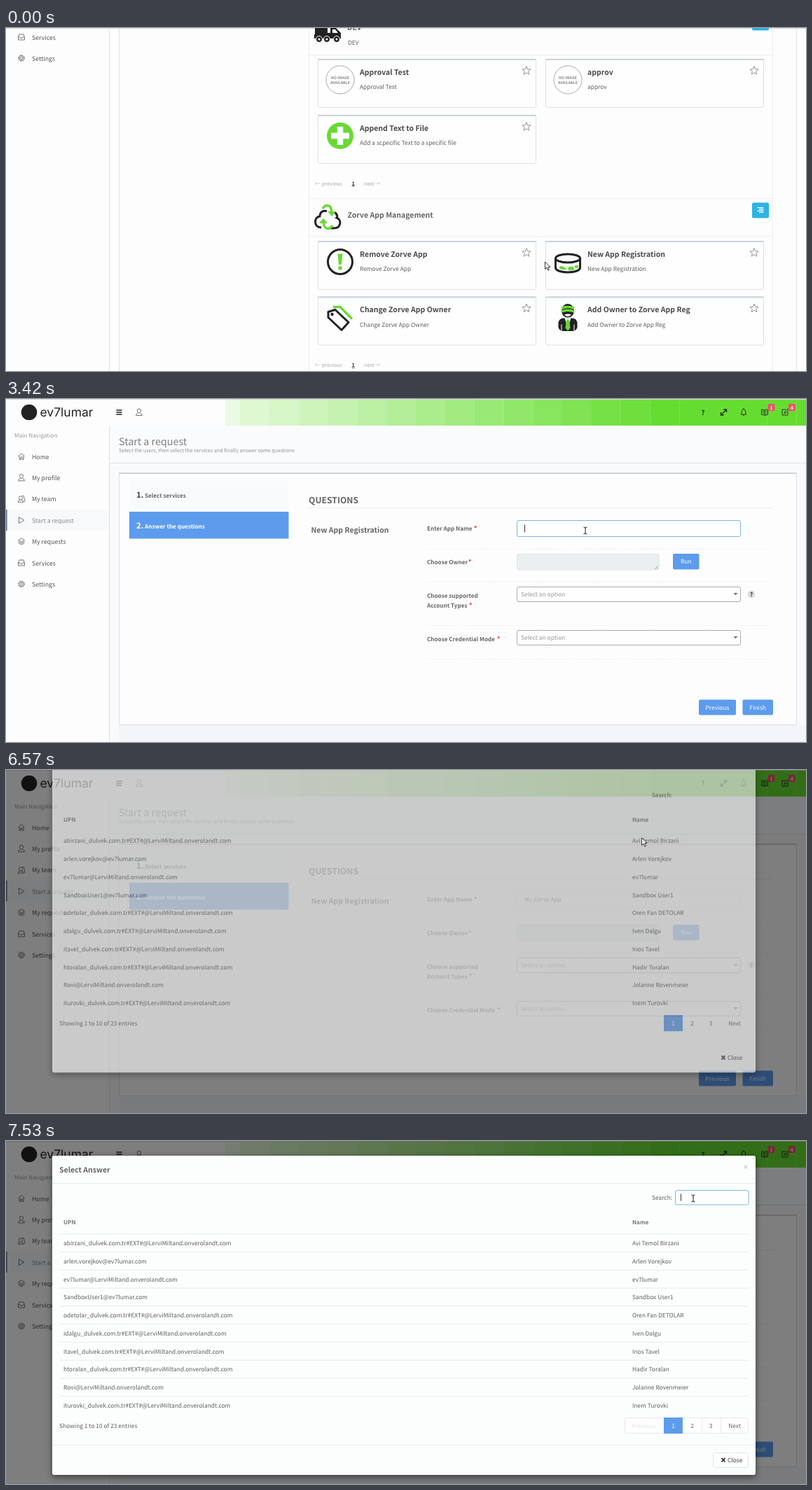
Animation, 1142 px wide and 490 px high, one loop 7.99 s. Source, as an HTML page:

```html
<!DOCTYPE html>
<html lang="en">
<head>
<meta charset="utf-8">
<title>Start a request</title>
<style>
  html, body { margin: 0; width: 100%; height: 100%; overflow: hidden; background: #fdfdfd; }
  svg { display: block; font-family: "Noto Sans CJK JP", "Noto Sans CJK SC", "Noto Sans CJK", "Noto Sans", sans-serif; }
  text { white-space: pre; text-rendering: geometricPrecision; }
  .line { fill: none; stroke: #777; }
  .ink { fill: none; stroke: #222; stroke-width: 3; }
  .lime { fill: none; stroke: #69d836; stroke-width: 3.4; }
  #sheet { filter: drop-shadow(0 3px 5px #0008); }
</style>
</head>
<body>
<svg id="stage" width="1142" height="490" viewBox="0 0 1142 490"></svg>
<script>
const LOOP = 7990, BLUE = '#5d9cec', LIME = '#69d836';
const $ = id => document.getElementById(id);

// Drawing helpers that return SVG markup
const text = (x, y, s, size = 8.4, fill = '#5e5e5e', more = '') =>
  `<text x="${x}" y="${y}" font-size="${size}" fill="${fill}" ${more}>${s}</text>`;
const bold = (x, y, s, size = 8.15, fill = '#666', more = '') =>
  text(x, y, s, size, fill, 'font-weight="700" ' + more);
const rect = (x, y, w, h, fill, more = '') =>
  `<rect x="${x}" y="${y}" width="${w}" height="${h}" fill="${fill}" ${more}/>`;
const box = (x, y, w, h, stroke, fill = '#fefefe', more = '') =>
  rect(x + .5, y + .5, w - 1, h - 1, fill, `rx="2.5" stroke="${stroke}" ${more}`);
const path = (d, more = 'class="line"') => `<path d="${d}" ${more}/>`;
const disc = (x, y, r, more) => `<circle cx="${x}" cy="${y}" r="${r}" ${more}/>`;
const at = (x, y, s) => `<g transform="translate(${x} ${y})">${s}</g>`;
const mid = 'text-anchor="middle"';
const button = (x, y, w, h, label, id = '') =>
  rect(x, y, w, h, BLUE, `rx="2" id="${id}"`) + text(x + w / 2, y + h / 2 + 3.2, label, 8.4, '#fff', mid);

const icons = {
  Home: path('M-4.5 0L0-4.5 4.5 0M-3-1V4.5H-1V1H1V4.5H3V-1'),
  'My profile': path('M0-5Q3-5 2.6-2 2 1 0 1-2 1-2.6-2-3-5 0-5M-1.5 1Q-4.5 2-4.5 4.5H4.5Q4.5 2 1.5 1'),
  'My team': path('M-1-4Q2-4 1.5-1 1 1.5-1 1.5-3 1.5-3.5-1-4-4-1-4M-2 1.5Q-5 2-5 4.5H3Q3 2 0 1.5M1-5Q4.5-5 4 -1 5 2 5 4.5'),
  'Start a request': path('M-3.5-4.5L4 0-3.5 4.5Z'),
  'My requests': path('M0-4.5L4.5-2 0 .5-4.5-2ZM-4.5 0L0 2.5 4.5 0M-4.5 2L0 4.5 4.5 2'),
  Services: path('M-4.5 0L-3-4H3L4.5 0V4H-4.5ZM-4.5 0H-2L-1 1.5H1L2 0H4.5'),
  Settings: disc(0, 0, 1.7, 'class="line"') + disc(0, 0, 3.6, 'class="line"') +
    disc(0, 0, 4.5, 'class="line" stroke-dasharray="1.6 1.93"')
};
const navItem = (name, y) =>
  at(22, y, icons[name]) + text(37, y + 3.6, name, 8.75, name == 'Start a request' ? '#888' : '#555');

const star = (x, y) => {
  let d = '';
  for (let i = 0; i < 10; i++) {
    const a = (i / 5 - .5) * Math.PI, r = i % 2 ? 2.8 : 6.4;
    d += `${i ? 'L' : 'M'}${x + r * Math.cos(a)} ${y + r * Math.sin(a)}`;
  }
  return path(d + 'Z', 'fill="none" stroke="#888" stroke-width=".9"');
};

// Service icons, centred on 0,0
const noImage = disc(0, 0, 20, 'fill="#fff" stroke="#aaa"') +
  bold(0, -1, 'NO IMAGE', 5.3, '#888', mid) + bold(0, 5.5, 'AVAILABLE', 5.3, '#888', mid);
const plus = disc(0, 0, 19, `fill="${LIME}"`) + path('M0-13V13M-13 0H13', 'stroke="#fff" stroke-width="8.5"');
const alertIcon = disc(0, 0, 17.5, 'class="ink"') +
  path('M-3.5-11.5H3.5L2 4H-2Z', `fill="${LIME}"`) + disc(0, 9, 2.8, `fill="${LIME}"`);
const disk = `<ellipse cy="-5" rx="17.5" ry="6" class="ink"/>` +
  path('M-17.5-5V9C-15 17 15 17 17.5 9V-5', 'class="ink"') +
  path('M-12 7Q-7 5-3 9T-12 10ZM0 8Q8 5 9 9T1 12ZM9 6Q15 3 15 7T10 8Z', `fill="${LIME}"`);
const tag = path('M-10-15H0L17 2', 'class="lime"') +
  path('M-17-8L-7-11 12 7 2 18-17 0Z', 'class="ink" stroke-linejoin="round"') + disc(-11.5, -4.5, 2.2, 'fill="#222"');
const person = path('M-9-9Q-8-19.5 0-19.5T9-9Q8 0 0 0T-9-9', 'fill="#222"') +
  path('M-9-13Q0-17 9-13M-9-8.5Q0-12 9-8.5', 'class="lime" stroke-width="2"') +
  path('M-5-4Q0 1 5-4Q0-6-5-4', 'fill="#fff"') +
  path('M-13.5 14V7Q-12 1-6 1H6Q12 1 13.5 7V14Q12 19.5 6 19.5H-6Q-12 19.5-13.5 14Z', 'fill="#222"') +
  path('M-4.5 1L0 15 4.5 1Z', 'fill="#fff"') + path('M-2 3H2L3.5 15 0 19-3.5 15Z', `fill="${LIME}"`) +
  path('M-9 10V19M9 10V19', 'stroke="#fff"');

const card = (x, y, icon, title, sub) =>
  box(x, y, 312, 70, '#dce1ea') + rect(x, y, 312, 2, '#c8d3e1', 'rx="1"') +
  at(x + 32, y + 30, icon) + star(x + 298, y + 17) +
  bold(x + 60, y + 22.6, title, 10.5, '#4a4a4a') + text(x + 60, y + 43, sub);
const pager = y => text(441, y, '←', 7.8, '#bbb') + text(451, y, 'previous', 7.2, '#aaa') +
  bold(493.5, y, '1', 7.5, '#333', 'text-decoration="underline"') +
  text(511, y, 'next', 7.2, '#aaa') + text(526, y, '→', 7.8, '#bbb');
const menuButton = y => rect(1065, y, 24, 22, '#2bb4e4', 'rx="2"') + at(1077, y + 10.5,
  path('M-4.5-3.3H4.5M-2-1.1H4.5M-4.5 1.1H4.5M-2 3.3H4.5', 'stroke="#fff" stroke-width="1.2"'));

const catalogue = rect(0, 0, 1142, 490, '#fdfdfd') + rect(0, 0, 1142, 1, '#d8d8d8') +
  path('M147.5 0V490M161.5 0V490M1128.5 0V490', 'stroke="#dfe2e7"') +
  path('M432.5 0V490M1094.5 0V490M432 38.5H1094M432 243.5H1094M432 297.5H1094', 'stroke="#eceef2"') +
  navItem('Services', 13) + navItem('Settings', 43) +
  path('M441 0H459V7H463V0H471L478 7V15H440V9H441Z', 'fill="#222"') + path('M466 2H470L474 7H466Z', 'fill="#fff"') +
  [447, 458, 472].map(x => disc(x, 16, 4.5, 'fill="#222" stroke="#fff"') + disc(x, 16, 1.5, 'fill="#fff"')).join('') +
  bold(487, 3, 'DEV', 10.5) + text(488, 24, 'DEV') + menuButton(-18.5) +
  card(445, 44, noImage, 'Approval Test', 'Approval Test') + card(770, 44, noImage, 'approv', 'approv') +
  card(445, 124, plus, 'Append Text to File', 'Add a scpecific Text to a specific file') + pager(224.5) +
  path('M450 285C439 285 439 270 448 269 448 262 454 260 458 262M469 263C474 267 473 270 472 271 480 274 478 286 468 286H463', 'class="ink"') +
  path('M452 258Q456 252 461 254 465 256 464.500 264M466 282Q462 288 457 286 453 283 453.500 277'.replace(/\.500/g, '.5'), 'class="lime"') +
  path('M459 262H471L465 269ZM447 279H459L453 272Z', `fill="${LIME}"`) +
  bold(487.5, 270.5, 'Zorve App Management', 10.5) + menuButton(249.5) +
  card(445, 304, alertIcon, 'Remove Zorve App', 'Remove Zorve App') +
  card(770, 304, disk, 'New App Registration', 'New App Registration') +
  card(445, 383.5, tag, 'Change Zorve App Owner', 'Change Zorve App Owner') +
  card(770, 383.5, person, 'Add Owner to Zorve App Reg', 'Add Owner to Zorve App Reg') + pager(484);

let bands = rect(313, 1, 22, 37, '#ecfae4');
for (let i = 0; i < 20; i++) {
  const p = Math.min(1, (i + 1) / 15), mix = (a, b) => Math.round(a + (b - a) * p);
  bands += rect(334.2 + i * 41.8, 1, 42, 37, `rgb(${mix(232, 101)},${mix(250, 221)},${mix(222, 48)})`);
}
const badge = (x, n) => rect(x - 5, 7, 10, 10, '#ed5565', 'rx="1"') + bold(x, 14.6, n, 6.5, '#fff', mid);
const dark = 'fill="none" stroke="#333"';
const bell = path('M-4 3H4Q2 1 2.5-2 2-4.5 0-4.5T-2.5-2Q-2 1-4 3M-1 4.5H1M0-6V-4.5', dark);
const book = path('M0-3Q-3-4.5-4.5-4V3.5Q-2 3 0 4.5 2 3 4.5 3.5V-4Q2-4.5 0-3V4M-3-1.5H-1M-3 1H-1M1.5-1.5H3.5M1.5 1H3.5', dark);
const pencil = path('M1-4H-4V4H4V-1M-1 1.5L-.5-1 4-5 5.5-3.5 1 1Z', dark);
const expand = path('M-3.5 3.5L3.5-3.5M0-4H4V0M-4 0V4H0', 'fill="none" stroke="#222" stroke-width="1.3"');
const topBar = bands +
  disc(33, 19, 11.3, 'fill="#222"') + text(48.5, 25, 'ev7lumar', 17.5, '#222', 'font-family="Inter, sans-serif"') +
  path('M157.5 16H165.5M157.5 19H165.5M157.5 22H165.5', 'stroke="#222" stroke-width="1.5"') + at(190, 19, icons['My profile']) +
  bold(995, 22.5, '?', 9.5, '#222', mid) + at(1024.5, 19, expand) + at(1053, 19, bell) +
  at(1083, 19, book) + at(1112, 19, pencil) + badge(1092.5, 1) + badge(1122, 4);

const label = (y, s, starX) => bold(601, y, s) + (starX ? bold(starX, y, '*', 9, '#e33') : '');
const dots = y => path(`M601 ${y}.5H1092`, 'stroke="#eceef0" stroke-dasharray="2 2"');
const select = y => box(729, y, 320, 22, '#aaa') + text(735, y + 13.8, 'Select an option', 8.4, '#999') +
  at(1041.5, y + 9, path('M-3 0H3L0 3.5Z', 'fill="#777"'));

let spinner = '';
for (let i = 0; i < 5; i++) spinner += `<circle cx="8" r="${1.2 + i * .12}" fill="#fff" transform="rotate(${i * 45})"/>`;

const form = rect(0, 0, 1142, 490, '#fdfdfd') + rect(148, 38, 994, 452, '#f9fafc') + rect(161, 466, 981, 24, '#f4f5f9') +
  rect(148, 38, 994, 53, '#fafbfd') + path('M147.5 38V490M148 91.5H1142', 'stroke="#dde1e8"') +
  rect(0, 0, 1142, 1, '#d8d8d8') + topBar +
  text(12, 55, 'Main Navigation', 8.2, '#999') +
  rect(2, 158, 145, 30, '#f8f9fb') + rect(0, 158, 1.7, 30, '#70809f') +
  Object.keys(icons).map((name, i) => navItem(name, 82 + i * 30.4)).join('') +
  text(161, 66, 'Start a request', 14.3, '#808080') +
  text(161, 75.5, 'Select the users, then select the services and finally answer some questions', 7.2, '#909090') +
  rect(161.5, 105.5, 967, 360, '#fdfdfd', 'id="panel" stroke="#dcdfe5" rx="2"') + rect(161, 105, 968, 2, '#d0d4db') +
  rect(176, 116, 227, 41, '#f9fafb') + bold(186, 141, '1.', 11.5, '#444') + bold(198, 141, 'Select services') +
  rect(176, 161, 227.5, 38.5, BLUE) + bold(186, 185, '2.', 11.5, '#fff') + bold(198, 185, 'Answer the questions', 8.15, '#fff') +
  bold(432, 149, 'QUESTIONS', 12.2) + path('M432 155.5H1094', 'stroke="#ebecef"') +
  bold(435.5, 190.5, 'New App Registration', 10.5) +
  label(188, 'Enter App Name', 668) + box(729, 173, 320, 24, '#e1e5ec', '#fefefe', 'id="field"') +
  text(740, 188.3, '', 8.4, '#555', 'id="typed"') + rect(740, 179.5, 1, 11, '#333', 'id="caret"') + dots(214) +
  label(235.5, 'Choose Owner', 660) + box(729, 221, 203.5, 23.5, '#dde2e4', '#eaf0f0') +
  path('M926 243L931 238M929 243L931 241', 'stroke="#888" stroke-width=".8"') + button(952, 221, 37.5, 22.5, 'Run', 'run') +
  `<g id="loader">${rect(581, 248, 514, 28, '#7084a2')}<g id="spin">${spinner}</g>` +
  text(614, 265.3, 'Please wait while we are loading script result', 8.4, '#f3f6fa') + '</g>' +
  '<g id="low">' + dots(261) + label(284, 'Choose supported') + label(298, 'Account Types', 661) + select(268) +
  disc(1064, 279, 5.4, 'fill="#dcdcdc"') + bold(1064, 282, '?', 8, '#222', mid) + dots(323) +
  label(346, 'Choose Credential Mode', 701) + select(330) + dots(371) +
  button(989, 429.5, 53, 22, 'Previous') + button(1051.5, 429.5, 43.5, 22, 'Finish') + '</g>' +
  `<g id="status">${rect(-.5, 478.5, 90, 13, '#dedede', 'stroke="#aaa" rx="1"')}` +
  text(3, 487.5, 'localhost/Requests/Start#', 6.92, '#333', 'font-family="Open Sans, sans-serif"') + '</g>';

const tenant = '@LerviMiltand.onverolandt.com', guest = '_dulvek.com.tr#EXT#' + tenant, local = '@ev7lumar.com';
const people = [
  ['abirzani' + guest, 'Avi Temol Birzani'], ['arlen.vorejkov' + local, 'Arlen Vorejkov'],
  ['ev7lumar' + tenant, 'ev7lumar'], ['SandboxUser1' + local, 'Sandbox User1'],
  ['odetolar' + guest, 'Oren Fan DETOLAR'], ['idalgu' + guest, 'Iven Dalgu'],
  ['itavel' + guest, 'Inos Tavel'], ['htoralan' + guest, 'Hadir Toralan'],
  ['Rovi' + tenant, 'Jolanne Rovenmeier'], ['iturovki' + guest, 'Inem Turovki']
];
let rules = '';
for (let i = 0; i < 10; i++) rules += `M76 ${i ? 132.9 + i * 25.75 : 132.5}H1060`;
const modal = rect(66, 21, 1004, 456, '#fcfdfd', 'rx="3" id="sheet"') +
  bold(76, 45, 'Select Answer', 10.5) + at(1056, 37, path('M-2.5-2.5L2.5 2.5M2.5-2.5L-2.5 2.5', 'stroke="#bbb"')) +
  text(922, 83.5, 'Search:') + bold(82, 119, 'UPN', 8.15, '#777') + bold(894, 119, 'Name', 8.15, '#777') +
  `<g id="rules">${path(rules + 'M66 60.5H1070M66 434.5H1070', 'stroke="#e6ecf1"')}` +
  box(883, 395, 177, 23, '#e6eaef') + path('M993.5 395V418M1020.5 395V418', 'stroke="#e6eaef"') +
  text(910.5, 410, 'Previous', 8.4, '#e2e4e7', mid) + box(1009, 445, 51, 22, '#e3e7ec') +
  box(955, 70, 105.5, 21.5, '#dfe5ec', '#fefefe', 'id="search"') + '</g>' +
  people.map(([upn, name], i) => text(82, 149.2 + i * 25.75, upn) + text(894, 149.2 + i * 25.75, name)).join('') +
  text(76, 409.5, 'Showing 1 to 10 of 23 entries') + rect(939, 395, 27, 23, BLUE) +
  text(952.5, 410, '1', 8.4, '#fff', mid) + text(979.5, 410, '2', 8.4, '#666', mid) +
  text(1006, 410, '3', 8.4, '#666', mid) + text(1040, 410, 'Next', 8.4, '#666', mid) +
  at(1024, 455.7, path('M-2.5-2.7L2.5 2.7M2.5-2.7L-2.5 2.7', 'stroke="#444" stroke-width="2"')) +
  text(1030, 458.7, 'Close', 8.4, '#444') + rect(963, 75.5, 1, 10, '#333', 'id="searchCaret"');

const outline = 'fill="#fff" stroke="#222" stroke-width=".9" stroke-linejoin="round"';
const cursors = {
  arrow: path('M.5 0V10.5L3 8.3 4.8 12.3 6.5 11.5 4.7 7.6H8Z', outline),
  hand: path('M-1 0Q.5-1 1.2 .5V4.5L5.5 5.5Q7 6 6.5 8.5L5.5 13H0L-3.5 8.5Q-4 6-3 6.5L-1 8Z', outline),
  beam: path('M-2.5-5Q0-5 0-3.5 0-5 2.5-5M0-4V4M-2.5 5Q0 5 0 3.5 0 5 2.5 5', 'fill="none" stroke="#222"')
};

$('stage').innerHTML = catalogue + `<g id="form">${form}</g>` + rect(0, 0, 1142, 490, '#000', 'id="shade" opacity=".5"') +
  `<g id="modal">${modal}</g><g id="cursor">` +
  Object.entries(cursors).map(([k, s]) => `<g id="${k}">${s}</g>`).join('') + '</g>';

// time, x, y
const route = [[0, 769, 334], [70, 769, 334], [200, 782, 322], [330, 803, 309], [430, 806, 318], [540, 800, 333],
  [1480, 800, 333], [1890, 827, 188], [5820, 827, 188], [6080, 968, 230], [6200, 968, 230], [6480, 970, 85],
  [6500, 970, 85], [6570, 907, 97], [6770, 914, 83], [7390, 981, 82], [LOOP, 981, 82]];
// time from which each value holds
const poses = [[0, 'arrow'], [330, 'hand'], [1620, 'arrow'], [1860, 'beam'], [5890, 'arrow'], [6040, 'hand'],
  [6250, 'arrow'], [7300, 'beam']];
const typing = [[0, ''], [3550, 'M'], [3750, 'My'], [4350, 'My '], [4680, 'My Z'], [4880, 'My Zo'], [5080, 'My Zor'],
  [5220, 'My Zorv'], [5320, 'My Zorve '], [5420, 'My Zorve App']];
const held = (list, t) => list.filter(k => k[0] <= t).pop()[1];
const ramp = (t, a, b) => Math.max(0, Math.min(1, (t - a) / (b - a)));
const show = (id, on) => $(id).style.display = on ? '' : 'none';
const set = (id, name, value) => $(id).setAttribute(name, value);

function draw(t) {
  const i = Math.max(1, route.findIndex(k => k[0] > t)), a = route[i - 1], b = route[i], p = ramp(t, a[0], b[0]);
  set('cursor', 'transform', `translate(${a[1] + (b[1] - a[1]) * p} ${a[2] + (b[2] - a[2]) * p})`);
  const pose = held(poses, t);
  for (const k in cursors) show(k, k == pose);

  show('form', t >= 740);
  set('form', 'opacity', .2 + .8 * ramp(t, 740, 1080));
  show('status', t < 1620);

  const focus = t < 6150 ? ramp(t, 2150, 2410) : 0;
  set('field', 'stroke', `rgb(${225 - 103 * focus},${229 - 46 * focus},${236 - 4 * focus})`);
  $('typed').textContent = held(typing, t);
  show('caret', t >= 2410 && t < 6150 && !(t >= 2880 && t < 3420) && !(t >= 3950 && t < 4350));
  set('caret', 'x', 740 + $('typed').getComputedTextLength());

  const loading = t >= 6160 && t < 6570;
  show('loader', loading);
  set('spin', 'transform', `translate(593 262) rotate(${90 + 45 * Math.floor((t - 6500) / 70)})`);
  set('low', 'transform', `translate(0 ${loading ? 34.5 : 0})`);
  set('panel', 'height', loading ? 394.5 : 360);
  set('run', 'fill', loading ? '#4a89e4' : BLUE);

  show('shade', t >= 6570);
  show('modal', t >= 6570);
  set('modal', 'opacity', .6 + .4 * ramp(t, 6570, 6710));
  set('modal', 'transform', `translate(0 ${-45 * (1 - ramp(t, 6570, 7065)) ** 2})`);
  show('rules', t >= 6980);
  set('search', 'stroke', t >= 7530 ? '#7ab7e8' : '#dfe5ec');
  show('searchCaret', t >= 7530);
}

const start = performance.now();
function tick() {
  draw((performance.now() - start) % LOOP);
  requestAnimationFrame(tick);
}
tick();
</script>
</body>
</html>
```
